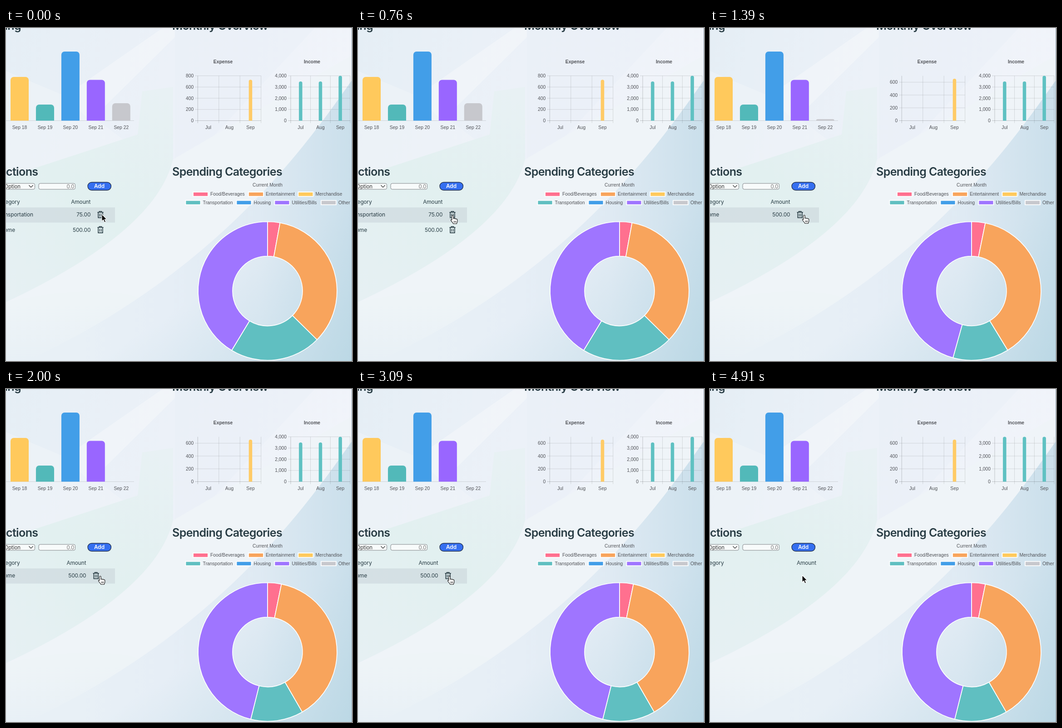
An HTML page with a canvas that plays this animation: 762x735 px, repeating every 4.94 s.

```html
<!DOCTYPE html>
<html lang="en">
<head>
<meta charset="utf-8">
<title>Budget dashboard</title>
<style>
html, body { margin: 0; width: 100%; height: 100%; overflow: hidden; }
canvas { display: block; }
</style>
</head>
<body>
<canvas width="762" height="735"></canvas>
<script>
const ctx = document.querySelector('canvas').getContext('2d');
const LOOP = 4940, EXPENSE_DELETED = 935, INCOME_DELETED = 3640, HAND_FROM = 130;
const BASE = 204.5, TOP = 105.5, INK = '#283c44', LABEL = '#505257';
const UI = 'Inter, sans-serif', CHART = '"Liberation Sans", Arial, sans-serif';
const COLORS = {
  food: '#ff708f', fun: '#f8a45c', goods: '#ffc95c', travel: '#60bfc1',
  housing: '#429ee8', bills: '#9f75ff', other: '#c7c8cd'
};

const mix = (a, b, p) => a + (b - a) * p;
const clamp = p => Math.min(1, Math.max(0, p));
const easeOutQuart = p => 1 - (1 - clamp(p)) ** 4;
const smooth = p => (p = clamp(p)) * p * (3 - 2 * p);

function text(s, x, y, { size = 10.3, weight = 400, family = CHART, color = LABEL, align = 'center', spacing = 0 } = {}) {
  ctx.font = `${weight} ${size}px ${family}`;
  ctx.letterSpacing = spacing + 'px';
  ctx.textAlign = align;
  ctx.fillStyle = color;
  ctx.fillText(s, x, y);
}
const heading = (s, x, y, align) =>
  text(s, x, y, { size: 25, weight: 600, family: UI, color: INK, align, spacing: -0.6 });
const cell = (s, x, y) =>
  text(s, x, y, { size: 11.9, family: UI, color: INK, align: 'right', spacing: -0.1 });

function line(x1, y1, x2, y2, color = 'rgba(0,0,0,.12)') {
  ctx.strokeStyle = color;
  ctx.lineWidth = 1;
  ctx.beginPath();
  ctx.moveTo(x1, y1);
  ctx.lineTo(x2, y2);
  ctx.stroke();
}

function box(x, y, w, h, r, fill, stroke, lineWidth = 1) {
  ctx.beginPath();
  ctx.roundRect(x, y, w, h, r);
  ctx.fillStyle = fill;
  ctx.fill();
  if (!stroke) return;
  ctx.strokeStyle = stroke;
  ctx.lineWidth = lineWidth;
  ctx.stroke();
}

function shape(d, fill, stroke, lineWidth = 1) {
  const path = new Path2D(d);
  if (fill) { ctx.fillStyle = fill; ctx.fill(path); }
  if (stroke) { ctx.strokeStyle = stroke; ctx.lineWidth = lineWidth; ctx.stroke(path); }
}

function at(x, y, draw) {
  ctx.save();
  ctx.translate(x, y);
  draw();
  ctx.restore();
}

function gradient(x1, y1, x2, y2, ...colors) {
  const g = ctx.createLinearGradient(x1, y1, x2, y2);
  colors.forEach((c, i) => g.addColorStop(i / (colors.length - 1), c));
  return g;
}

function bar(center, width, top, color, r) {
  const h = BASE - top;
  if (h > 0.2) box(center - width / 2, top, width, h, [Math.min(r, h), Math.min(r, h), 0, 0], color);
}

function background() {
  ctx.fillStyle = gradient(0, 0, 700, 260, '#e5eef5', '#ecf1f8', '#f1f4fa');
  ctx.fillRect(0, 0, 762, 735);
  shape('M345 0L130 150L185 205L372 20V0Z', 'rgba(247,249,252,.5)');
  shape('M0 95L130 150L290 270L0 420Z', 'rgba(242,246,250,.5)');
  shape('M372 0H680L372 330Z', 'rgba(234,239,248,.5)');
  shape('M0 330L290 235L300 140L368 130V290Q330 450 0 605Z', gradient(0, 600, 360, 150, '#e6f0f3', '#e2f0f0', '#e8f1f4'));
  shape('M0 605Q330 450 368 290L762 60V735H0Z', '#eff4f8');
  shape('M0 605Q200 560 310 600Q200 670 45 735H0Z', gradient(0, 610, 0, 735, '#eef4f7', '#e8f0f6'));
  const valley = 'M762 115C680 230 480 535 45 735H762Z';
  shape(valley, gradient(150, 0, 762, 0, '#e8f0f6', '#e6eef6', '#dfeaf3', '#cadfeb'));
  shape(valley, gradient(600, 480, 762, 735, 'rgba(160,203,218,0)', 'rgba(160,203,218,.35)'));
  line(761.5, 0, 761.5, 735, '#9eb0be');
}

function spending(t) {
  const left = 1 - easeOutQuart((t - EXPENSE_DELETED) / 1000);
  line(0, BASE, 282, BASE);
  [['#ffc95c', 108], ['#52b9b9', 169], ['#429ee8', 52], ['#9966ff', 114.5], ['#c7c8cd', BASE - 38.5 * left]]
    .forEach(([color, top], i) => {
      const x = 30 + i * 55.95;
      bar(x, 40, top, color, 7);
      text('Sep ' + (18 + i), x, 222.5);
    });
}

// Bars keep their pixel height when the scale switches, then ease to the new one.
function monthly({ title, x, right, step, color, before, after, max, deleted }, t) {
  const width = right - x, done = t >= deleted;
  const p = easeOutQuart((t - deleted) / 1000);
  const scale = max[+done];
  const yOf = (v, m) => BASE - (BASE - TOP) * v / m;
  text(title, (x + right) / 2 - (right > 700 ? 18.5 : 14), 78, { weight: 700 });
  for (let v = 0; v <= scale; v += step) {
    const y = yOf(v, scale);
    line(x - 6, y, right, y, v ? undefined : 'rgba(0,0,0,.2)');
    text(v.toLocaleString('en-US'), x - 9, y + 3.7, { align: 'right' });
  }
  for (let i = 0; i < 4; i++) {
    const gx = x + width * i / 3;
    line(gx, TOP, gx, 210, i ? undefined : 'rgba(0,0,0,.2)');
  }
  ['Jul', 'Aug', 'Sep'].forEach((month, i) => {
    const cx = x + width * (i + 0.5) / 3;
    text(month, cx, 222.5);
    bar(cx, 7.5, mix(yOf(before[i], max[0]), yOf(after[i], max[1]), p), color, 3.5);
  });
}

const EXPENSE = {
  title: 'Expense', x: 422.3, right: 561.7, step: 200, color: '#ffcb66',
  before: [0, 0, 730], after: [0, 0, 655], max: [800, 700], deleted: EXPENSE_DELETED
};
const INCOME = {
  title: 'Income', x: 627, right: 758, step: 1000, color: '#5fc1c2',
  before: [3500, 3500, 4000], after: [3500, 3500, 3500], max: [4000, 3500], deleted: INCOME_DELETED
};

function legend() {
  text('Current Month', 576, 350);
  [['Food/Beverages', 'food', 412, 0], ['Entertainment', 'fun', 534, 0], ['Merchandise', 'goods', 643.5, 0],
   ['Transportation', 'travel', 395.5, 1], ['Housing', 'housing', 507.5, 1],
   ['Utilities/Bills', 'bills', 591.5, 1], ['Other', 'other', 694, 1]]
    .forEach(([name, key, x, row]) => {
      const y = 362 + row * 18.6;
      box(x, y, 33, 9.6, 0, COLORS[key], '#fff', 1.8);
      text(name, x + 38, y + 8.4, { align: 'left' });
    });
}

function donut(t) {
  const p = easeOutQuart((t - EXPENSE_DELETED) / 1000);
  let start = -Math.PI / 2;
  [['food', 21, 21], ['fun', 252, 252], ['travel', 155, 80], ['bills', 302, 302]].forEach(([key, a, b]) => {
    const end = start + 2 * Math.PI * mix(a / 730, b / 655, p);
    ctx.beginPath();
    ctx.arc(576, 580.5, 153, start, end);
    ctx.arc(576, 580.5, 77, end, start, true);
    ctx.closePath();
    ctx.fillStyle = COLORS[key];
    ctx.fill();
    ctx.strokeStyle = '#fff';
    ctx.lineWidth = 1.7;
    ctx.stroke();
    start = end;
  });
}

function trash(x, y) {
  at(x, y, () => {
    shape('M-6.7 -5.2H6.7M-2.6 -5.5V-7.3H2.6V-5.5M-4.9 -5V6.6H4.9V-5', null, INK, 1.6);
    shape('M-1.7 -2.3V4M1.7 -2.3V4', null, INK, 1.4);
  });
}

function form() {
  box(-40, 343, 103.5, 13, 3.5, 'rgba(255,255,255,.75)', '#808488');
  text('Select Option', 32, 353.6, { size: 11.3, family: UI, color: '#333', align: 'right' });
  shape('M50.5 347L55 351.7L59.5 347', null, '#333', 1.2);
  box(72, 343, 80.5, 13, 3.5, 'rgba(255,255,255,.75)', '#808488');
  text('0.0', 150.5, 353.5, { size: 11.3, family: UI, color: '#777', align: 'right' });
  box(180, 340.5, 51.5, 17.5, 8.75, '#356ff0', '#24324f', 1.3);
  text('Add', 205.5, 353.3, { size: 11.8, weight: 600, family: UI, color: '#fff' });
}

function table(t) {
  const rows = [['Transportation', '75.00', 60], ['Income', '500.00', 20]];
  const count = t < EXPENSE_DELETED ? 2 : t < INCOME_DELETED ? 1 : 0;
  const right = [234, 176.5, 186.3][count];
  cell('Category', 30.5, 388);
  cell('Amount', right, 388);
  if (count) {
    ctx.fillStyle = 'rgba(60,65,90,.085)';
    ctx.fillRect(0, 396, 240, 33.5);
  }
  rows.slice(2 - count).forEach(([name, amount, x], i) => {
    const y = 412 + i * 33.5;
    cell(name, x, y + 4.3);
    cell(amount, right, y + 4.3);
    trash(right + 21.7, y);
  });
}

function cursor(t) {
  const x = 211 - smooth(t / 250) - smooth((t - 800) / 300) - 6 * smooth((t - 2350) / 350);
  const y = 411 + 0.8 * (smooth(t / 250) - smooth((t - 800) / 300));
  ctx.lineJoin = 'round';
  if (t >= HAND_FROM && t < INCOME_DELETED) {
    at(x - 1.5, y + 2.2, () => {
      shape('M-1.7 1.5a1.7 1.7 0 0 1 3.4 0V7c.5-1.1 3-1 3.2.4.6-.9 2.7-.7 2.9.6.8-.7 2.5-.3 2.5 1.3v3.8c0 2-1.4 2.8-1.4 4.9H1.3c-.5-2-2.6-3.6-4.9-6.9-1.2-1.9.6-3.1 1.9-1.5z',
        '#fff', '#111', 1.1);
      shape('M2.8 11.8V15.5M5 11.8V15.5M7.2 11.8V15.5', null, '#111', 0.9);
    });
  } else {
    at(x, y, () => shape('M0 0V15.6L3.5 12.3L5.9 18L8.6 16.9L6.2 11.3H11Z', '#000', '#fff', 1.1));
  }
  ctx.lineJoin = 'miter';
}

function frame(now) {
  const t = now % LOOP;
  background();
  heading('Weekly Spending', 33, 3.5, 'right');
  heading('Monthly Overview', 366, 3.5, 'left');
  heading('Transactions', 70.5, 326.3, 'right');
  heading('Spending Categories', 366, 326.3, 'left');
  spending(t);
  monthly(EXPENSE, t);
  monthly(INCOME, t);
  legend();
  donut(t);
  form();
  table(t);
  cursor(t);
  requestAnimationFrame(() => frame(performance.now()));
}
frame(performance.now());
</script>
</body>
</html>
```
